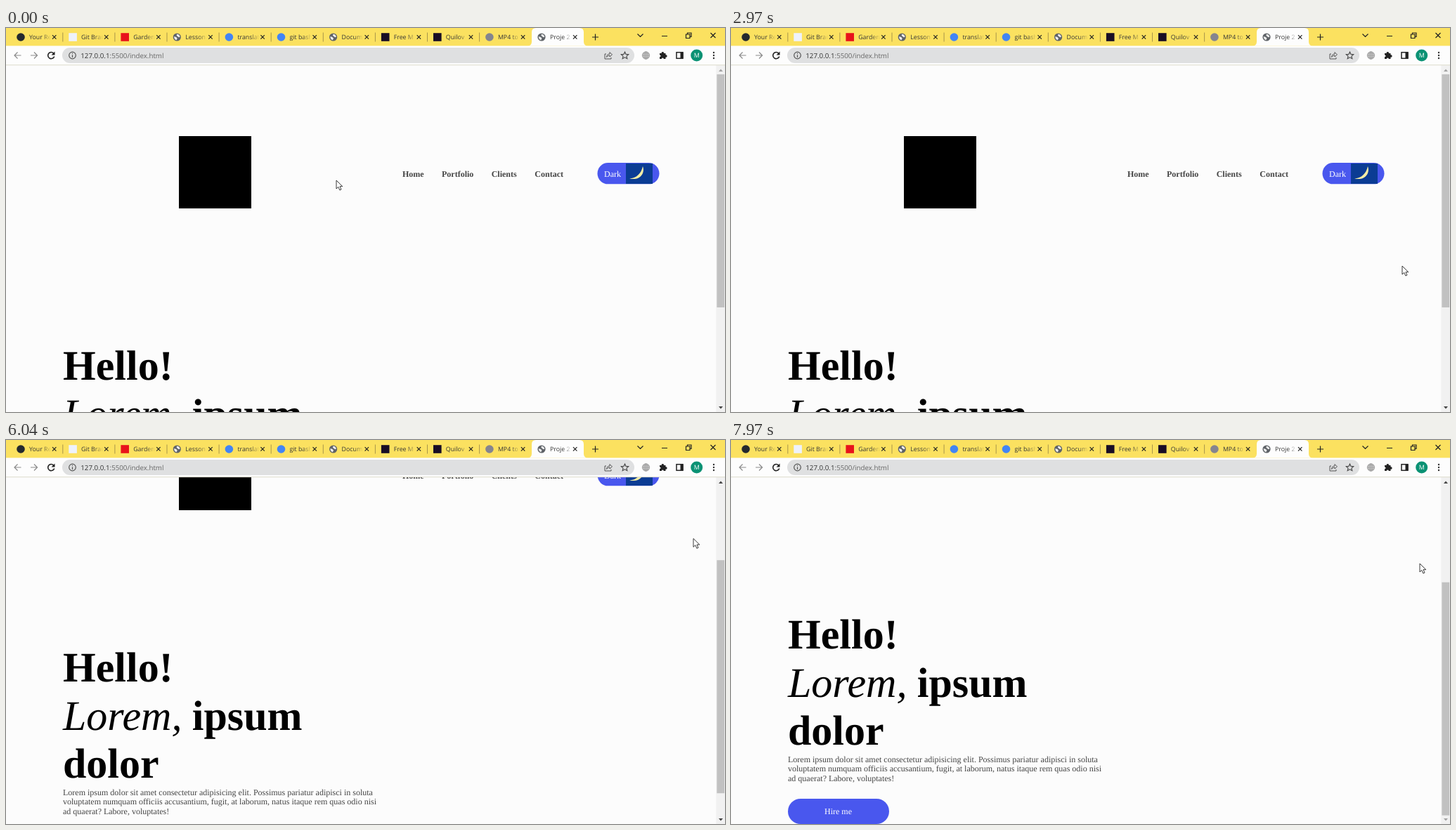
An HTML page that plays this animation: 1023x547 px, repeating every 8000 ms.

```html
<!DOCTYPE html>
<html lang="en">
<head>
<meta charset="utf-8">
<title>Portfolio page</title>
<style>
  html, body { margin: 0; width: 100%; height: 100%; overflow: hidden; background: #fdfdfd; }
  svg { display: block; }
  text { white-space: pre; text-rendering: geometricPrecision; }
  .ui { font-family: "Open Sans", sans-serif; }
  .page { font: 12px "Liberation Serif", serif; fill: #444; }
  .nav { font-weight: bold; }
  .big { font-size: 60px; fill: #000; }
  .bold { font-weight: bold; }
  .white { fill: #fff; }
  .line { fill: none; stroke: #222; stroke-width: 1.2; }
</style>
</head>
<body>
<svg width="1023" height="547" viewBox="0 0 1023 547">
  <defs>
    <linearGradient id="fade" gradientUnits="userSpaceOnUse" x1="18" x2="31">
      <stop stop-color="#333"/><stop offset="1" stop-color="#333" stop-opacity="0"/>
    </linearGradient>
    <g id="globe">
      <circle r="5.6" fill="#5f6368"/>
      <path d="M-4.3-.8 Q-1.5-1 0 1 Q1 2.5-1 4.2 Q-4 3-4.3-.8Z M0-4.3 Q3.5-4 4.3-.5 Q2 1 1-1 Q-1.5-2 0-4.3Z" fill="#eee"/>
    </g>
  </defs>

  <!-- Scrolling page -->
  <svg y="53" width="1011" height="494" viewBox="0 53 1011 494">
    <rect width="1011" height="547" fill="#fcfcfc"/>
    <g id="page" class="page">
      <rect x="246" y="154" width="103" height="103" fill="#000"/>
      <g class="nav">
        <text x="564" y="211.5">Home</text>
        <text x="620" y="211.5">Portfolio</text>
        <text x="690.7" y="211.5">Clients</text>
        <text x="752.3" y="211.5">Contact</text>
      </g>
      <rect x="841.5" y="192" width="88" height="30.3" rx="15.1" fill="#4957ee"/>
      <text class="white" x="851" y="211.5">Dark</text>
      <rect x="882" y="193" width="38" height="29" fill="#0b3c94"/>
      <path d="M906 197 C909.5 206 903 218 887 214.5 C897 214 904 207 906 197Z" fill="#f3eda6"/>
      <g class="big">
        <text class="bold" x="81" y="501">Hello!</text>
        <text x="81" y="569.7" font-style="italic">Lorem,</text>
        <text class="bold" x="264.8" y="569.7">ipsum</text>
        <text class="bold" x="81" y="638.3">dolor</text>
      </g>
      <text x="81" y="662.5">Lorem ipsum dolor sit amet consectetur adipisicing elit. Possimus pariatur adipisci in soluta</text>
      <text x="81" y="676">voluptatem numquam officiis accusantium, fugit, at laborum, natus itaque rem quas odio nisi</text>
      <text x="81" y="689.5">ad quaerat? Labore, voluptates!</text>
      <rect x="81" y="715" width="144" height="36" rx="18" fill="#4957ee"/>
      <text class="white" x="133" y="737">Hire me</text>
    </g>
  </svg>

  <!-- Scrollbar -->
  <rect x="1010.4" y="53" width="12.6" height="494" fill="#f1f1f1"/>
  <rect id="thumb" x="1011.4" y="66" width="10.8" height="332" fill="#c1c1c1"/>
  <path id="up" d="M1014 62 L1017 58.5 L1020 62Z"/>
  <path id="down" d="M1014 539 L1017 542.5 L1020 539Z"/>

  <!-- Browser frame -->
  <rect width="1023" height="26" fill="#fbe160"/>
  <rect y="25.4" width="1023" height="27.2" fill="#fdfdfd"/>
  <rect y="52.4" width="1023" height=".8" fill="#d5d2bf"/>
  <path d="M742 25.4 Q748 25.4 748 19.4 V6 Q748 0 754 0 H816 Q822 0 822 6 V19.4 Q822 25.4 828 25.4Z" fill="#fdfdfd"/>
  <g id="tabs" class="ui" font-size="8.8"></g>
  <path class="line" d="M834 13 H843 M838.5 8.5 V17.5 M898.5 8.5 L902.5 12.5 L906.5 8.5 M933 11.5 H941 M967.5 9 H973 V14.5 H967.5Z M969.5 9 V7 H975 V12.5 H973 M1002.5 7 L1009.5 14 M1009.5 7 L1002.5 14"/>

  <rect x="80" y="28" width="814" height="22" rx="11" fill="#dfe0e1"/>
  <path class="line" style="stroke:#8a8a8a" d="M21.5 39 H12 M16.5 34.5 L12 39 L16.5 43.5 M35 39 H44.5 M40 34.5 L44.5 39 L40 43.5"/>
  <path class="line" style="stroke-width:1.6" d="M67.7 36 A4.6 4.6 0 1 0 68.7 40.5"/>
  <path d="M69.5 33.5 V38.5 H64.5Z" fill="#222"/>
  <circle class="line" cx="94.5" cy="39" r="4.8" style="stroke:#555"/>
  <path class="line" style="stroke:#555" d="M94.5 38.3 V42 M94.5 35.8 V37"/>
  <text class="ui" x="106.3" y="42.6" font-size="9.75" fill="#333">127.0.0.1<tspan fill="#666">:5500/index.html</tspan></text>
  <path class="line" style="stroke:#555;stroke-width:1" d="M854 37 H852 V44 H861 V42 M854.5 41.5 Q855 37 859 37 V34.5 L862.5 38 L859 41 V39 Q856.5 39 854.5 41.5Z"/>
  <path class="line" style="stroke:#444;stroke-width:1.1" d="M880.5 34 L882 37.4 L885.7 37.7 L882.9 40.1 L883.8 43.7 L880.5 41.8 L877.2 43.7 L878.1 40.1 L875.3 37.7 L879 37.4Z"/>
  <g fill="#ccc" stroke="#999" stroke-width=".8">
    <circle cx="910.5" cy="39" r="5.2"/>
    <path fill="none" d="M905.3 39 H915.7 M910.5 33.8 V44.2 M906.5 36 H914.5 M906.5 42 H914.5"/>
    <ellipse fill="none" cx="910.5" cy="39" rx="2.6" ry="5.2"/>
  </g>
  <path fill="#222" d="M930 36 H932.7 A1.7 1.7 0 1 1 936 36 H938.5 V38.3 A1.7 1.7 0 1 1 938.5 41.6 V44 H935.8 A1.5 1.5 0 1 0 932.8 44 H930 V41.3 A1.5 1.5 0 1 0 930 38.3Z"/>
  <rect class="line" x="954" y="34.7" width="9" height="8.6" style="stroke-width:1.5"/>
  <rect x="959.5" y="34.7" width="4" height="8.6" fill="#222"/>
  <circle cx="982.7" cy="39" r="8.5" fill="#0b9274"/>
  <text class="ui white" x="982.7" y="42.3" font-size="9" text-anchor="middle">M</text>
  <g fill="#333"><circle cx="1007" cy="35" r="1.2"/><circle cx="1007" cy="39" r="1.2"/><circle cx="1007" cy="43" r="1.2"/></g>

  <path id="cursor" d="M0 0 V12 L2.8 9.4 L4.9 14 L7 13 L5 8.7 H8.8Z" fill="#fff" stroke="#222" stroke-width=".9"/>
</svg>

<script>
const LOOP = 8000, MAX_SCROLL = 204, SCROLL_START = 5645, SCROLL_TIME = 685;
const el = id => document.getElementById(id);

const circle = color => `<circle r="5.8" fill="${color}"/>`;
const square = color => `<rect x="-5.8" y="-5.8" width="11.6" height="11.6" fill="${color}"/>`;
const globe = '<use href="#globe"/>';

const tabs = [
  ['Your Re', circle('#24292e')], ['Git Bran', square('#eef2fb')], ['Garden', square('#e8131b')],
  ['Lesson', globe], ['translat', circle('#4285f4')], ['git bash', circle('#4285f4')],
  ['Docum', globe], ['Free M', square('#180d25')], ['Quilov', square('#180d25')],
  ['MP4 to', circle('#85858f')], ['Proje 2', globe]
];
el('tabs').innerHTML = tabs.map(([label, icon], i) => `
  <g transform="translate(${74.1 * i} 0)">
    <g transform="translate(21 13)">${icon}</g>
    <svg x="33" width="32" height="25"><text y="16" fill="url(#fade)">${label}</text></svg>
    <path class="line" d="M66 10.2 L71.4 15.6 M71.4 10.2 L66 15.6"/>
    ${i < 9 ? '<path d="M80.8 6.5 V19.5" stroke="#a8954a"/>' : ''}
  </g>`).join('');

// time, x, y
const pointerPath = [
  [0, 470, 217], [1770, 954, 240], [2970, 955, 339], [4770, 818, 107],
  [SCROLL_START, 978, 139], [6270, 978, 141], [7970, 980, 176], [LOOP, 980, 176]
];

function pointerAt(t) {
  const i = pointerPath.findIndex(p => p[0] > t);
  const [t0, x0, y0] = pointerPath[i - 1], [t1, x1, y1] = pointerPath[i];
  const u = (t - t0) / (t1 - t0), k = u * u * (3 - 2 * u);
  return [x0 + (x1 - x0) * k, y0 + (y1 - y0) * k];
}

function scrollAt(t) {
  const u = Math.min(1, Math.max(0, (t - SCROLL_START) / SCROLL_TIME));
  return MAX_SCROLL * (1 - (1 - u) ** 1.7);
}

function draw(now) {
  const t = now % LOOP, scroll = Math.round(scrollAt(t));
  el('page').setAttribute('transform', `translate(0 ${-scroll})`);
  el('thumb').setAttribute('y', 66 + scroll * 0.67);
  el('up').setAttribute('fill', scroll > 0 ? '#444' : '#a3a3a3');
  el('down').setAttribute('fill', scroll < MAX_SCROLL ? '#444' : '#a3a3a3');
  el('cursor').setAttribute('transform', `translate(${pointerAt(t)})`);
}

const start = performance.now();
function tick() {
  draw(performance.now() - start);
  requestAnimationFrame(tick);
}
tick();
</script>
</body>
</html>
```
